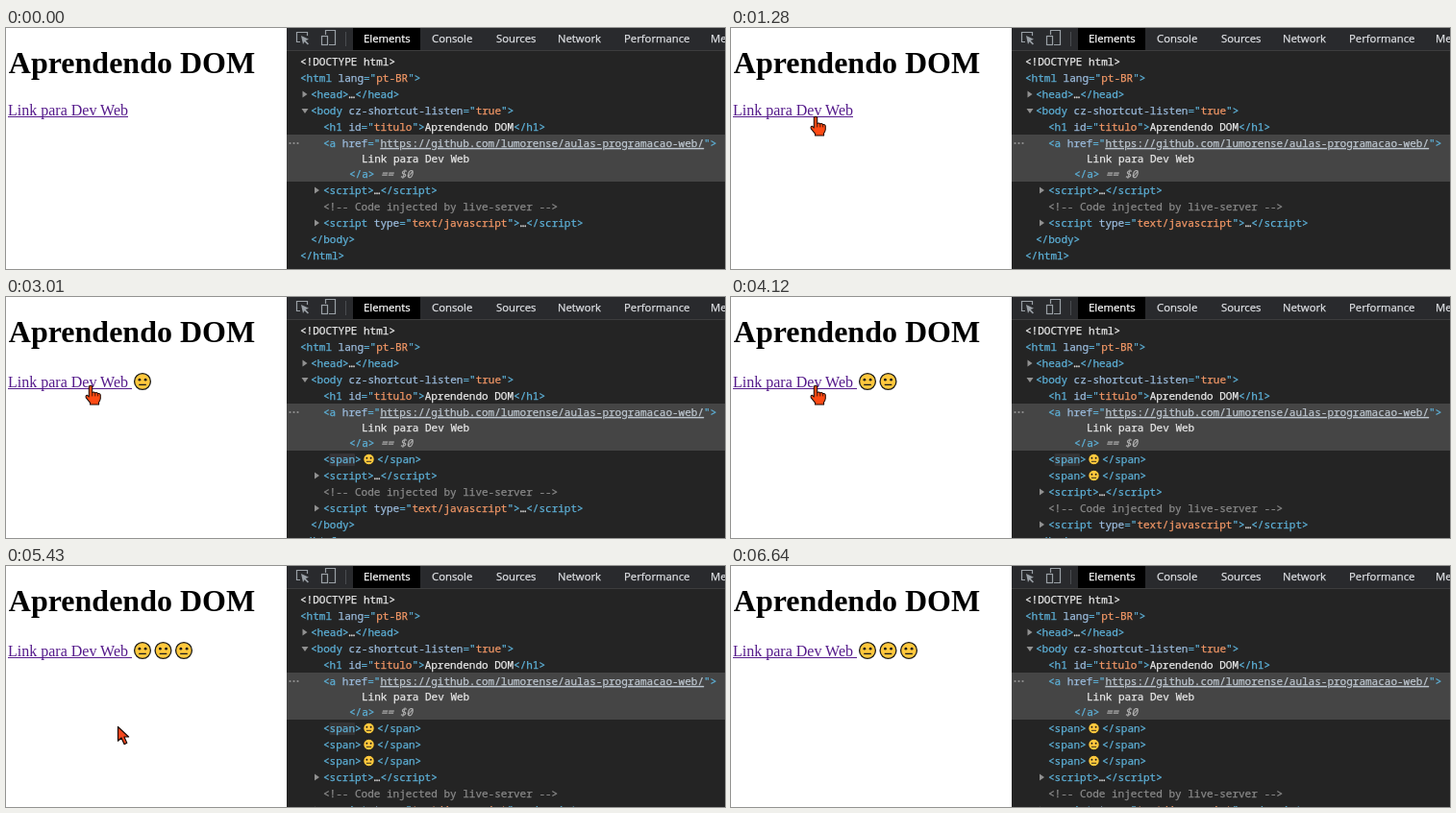
An HTML page for the animation above (6.68 s loop, 748x251 px).

```html
<!DOCTYPE html>
<html lang="pt-BR">
<head>
<meta charset="utf-8">
<style>
html, body { margin: 0; width: 100%; height: 100%; overflow: hidden; background: #fff; }
svg { display: block; }
text { white-space: pre; }
.page { font-family: "Liberation Serif", "Times New Roman", serif; }
.tabs { font: 11.3px "Open Sans", "Noto Sans", sans-serif; color: #dfe1e5; }
.code { font: 11px "Noto Sans Mono", "DejaVu Sans Mono", monospace; }
.tabs text, .code tspan { fill: currentColor; stroke: currentColor; stroke-width: .25; }
</style>
</head>
<body>
<svg id="stage" width="748" height="251" viewBox="0 0 748 251">
  <defs>
    <g id="face">
      <circle r="8.4" fill="#ffc83d" stroke="#1b1b1b" stroke-width="1.3"/>
      <circle cx="-3.1" cy="-1.8" r="1.4" fill="#1b1b1b"/>
      <circle cx="3.1" cy="-1.8" r="1.4" fill="#1b1b1b"/>
      <path d="M-3.8 3.4H3.8" stroke="#1b1b1b" stroke-width="1.3"/>
    </g>
  </defs>
  <rect width="748" height="251" fill="#fff"/>
  <g class="page">
    <text x="2.8" y="47" font-size="32" font-weight="700">Aprendendo DOM</text>
    <g id="link" fill="#551a8b">
      <text x="2" y="91" font-size="16">Link para Dev Web</text>
      <rect id="underline" x="2" y="92" width="125" height="1"/>
    </g>
    <g id="faces"></g>
  </g>

  <rect x="292" width="456" height="251" fill="#242424"/>
  <rect x="292" width="456" height="23" fill="#292a2d"/>
  <rect x="292" y="23" width="456" height="1" fill="#3d3d3d"/>
  <rect x="361" width="70" height="23" fill="#000"/>
  <rect x="353" y="4" width="1" height="15" fill="#4a4c50"/>
  <g fill="none" stroke="#9aa0a6" stroke-width="1.2">
    <path d="M306 14.5H302.5V4.5H313.5V8"/>
    <path d="M307 8L315 11.7L311.7 13L315 16.5L313.8 17.6L310.5 14.2L309 17Z" fill="#9aa0a6" stroke="none"/>
    <path d="M332.5 7V2.5H342.5V17.5H336"/>
    <rect x="328.5" y="8.5" width="6" height="9"/>
  </g>
  <g class="tabs" id="tabs"></g>
  <rect x="292" y="111" width="456" height="49" fill="#454545"/>
  <g fill="#919191">
    <circle cx="295.5" cy="120" r="1.1"/><circle cx="299.5" cy="120" r="1.1"/><circle cx="303.5" cy="120" r="1.1"/>
  </g>
  <g class="code" id="fixed"></g>
  <g class="code" id="spans"></g>
  <g class="code" id="rest"></g>

  <g id="hand" stroke="#1a0a05" stroke-linejoin="round">
    <path d="M-1.8 1.2Q0-.8 1.8 1.2V8Q3.4 6.6 5 8.3Q6.8 7.3 8 9Q10.2 8.4 10.8 10.4V14.5Q10.5 17 9 18.5V21H-.5V19L-5 13.5Q-5.8 11 -3.6 10.8L-1.8 12.5Z" fill="#ff4a14" stroke-width="1.1"/>
    <path d="M1.8 8V12M5 8.5V12M8 9.2V12" fill="none" stroke-width=".8"/>
  </g>
  <path id="arrow" d="M.5 .5V15.2L4 12L7 18.6L9.8 17.3L6.9 11H11.6Z" fill="#f4481e" stroke="#1a0a05" stroke-width="1.2" stroke-linejoin="round"/>
</svg>
<script>
const LOOP = 6680;
const CLICKS = [2130, 3170, 4450];
const ROW = 17;
const TAG = "#5db0d7", ATTR = "#9bbbdc", VALUE = "#f29766", TEXT = "#e8e8e8", NOTE = "#898989", URL_COLOR = "#bdc6cf";
const $ = id => document.getElementById(id);
const clamp = (v, low = 0, high = 1) => Math.min(high, Math.max(low, v));

function add(parent, name, attrs = {}, content = "") {
  const node = document.createElementNS("http://www.w3.org/2000/svg", name);
  for (const key in attrs) node.setAttribute(key, attrs[key]);
  node.textContent = content;
  parent.append(node);
  return node;
}

// The two wrapped lines of the selected element sit 1px tighter.
const baseline = row => 39 + row * ROW - clamp(row - 5, 0, 2);

// parts: alternating colour and text
function line(parent, row, x, ...parts) {
  const text = add(parent, "text", { x, y: baseline(row) });
  for (let i = 0; i < parts.length; i += 2) add(text, "tspan", { color: parts[i] }, parts[i + 1]);
  return text;
}

function toggle(parent, row, x, open) {
  const d = open ? "M-1-2H6L2.5 3Z" : "M0-3.5L5 0L0 3.5Z";
  add(parent, "path", { d, fill: "#919191", transform: `translate(${x} ${baseline(row) - 4})` });
}

[["Elements", 372], ["Console", 443], ["Sources", 510], ["Network", 574], ["Performance", 643], ["Memory", 733]]
  .forEach(([name, x], i) => add($("tabs"), "text", { x, y: 15, ...(i ? {} : { color: "#fff" }) }, name));

const fixed = $("fixed"), rest = $("rest");
line(fixed, 0, 306, TEXT, "<!DOCTYPE html>");
line(fixed, 1, 306, TAG, "<html ", ATTR, "lang", TAG, '="', VALUE, "pt-BR", TAG, '">');
line(fixed, 2, 317, TAG, "<head>", TEXT, "…", TAG, "</head>");
toggle(fixed, 2, 308.5);
line(fixed, 3, 317, TAG, "<body ", ATTR, "cz-shortcut-listen", TAG, '="', VALUE, "true", TAG, '">');
toggle(fixed, 3, 308.5, true);
line(fixed, 4, 330, TAG, "<h1 ", ATTR, "id", TAG, '="', VALUE, "titulo", TAG, '">', TEXT, "Aprendendo DOM", TAG, "</h1>");
const anchor = line(fixed, 5, 330, TAG, "<a ", ATTR, "href", TAG, '="',
  URL_COLOR, "https://github.com/lumorense/aulas-programacao-web/", TAG, '">');
anchor.children[3].setAttribute("text-decoration", "underline");
line(fixed, 6, 370, TEXT, "Link para Dev Web");
const closing = line(fixed, 7, 357, TAG, "</a>", "#b4b4b4", " == $0");
closing.children[1].setAttribute("font-style", "italic");

line(rest, 8, 330, TAG, "<script>", TEXT, "…", TAG, "<\/script>");
toggle(rest, 8, 321);
line(rest, 9, 330, NOTE, "<!-- Code injected by live-server -->");
line(rest, 10, 330, TAG, "<script ", ATTR, "type", TAG, '="', VALUE, "text/javascript", TAG, '">', TEXT, "…", TAG, "<\/script>");
toggle(rest, 10, 321);
line(rest, 11, 317, TAG, "</body>");
line(rest, 12, 306, TAG, "</html>");

const spans = CLICKS.map((_, i) => {
  const group = add($("spans"), "g");
  const flash = add(group, "rect", { x: 336.5, y: baseline(8) - 10, width: 26.5, height: 13, rx: 1 });
  const name = line(group, 8, 330, TAG, "<", TAG, "span", TAG, ">").children[1];
  line(group, 8, 386, TAG, "</span>");
  add(group, "use", { href: "#face", transform: `translate(377.5 ${baseline(8) - 4}) scale(.68)` });
  const face = add($("faces"), "use", { href: "#face", x: 142 + i * 21.5, y: 88 });
  return { group, flash, name, face };
});

const smooth = v => v * v * (3 - 2 * v);
const easeOut = v => 1 - (1 - v) ** 2.4;
const mix = (a, b, k) => `rgb(${a.map((v, i) => Math.round(v + (b[i] - v) * k))})`;

// Purple fades to grey, then to the panel colour.
function flashColor(age) {
  return age < 1120
    ? mix([158, 54, 153], [51, 51, 51], easeOut(clamp(age / 1120)))
    : mix([51, 51, 51], [36, 36, 36], smooth(clamp((age - 1120) / 280)));
}

// time, x, y of the pointer tip
const PATH = [[560, 124, 253], [1140, 90, 92], [4950, 90, 92], [5350, 116, 167], [5850, 116, 167], [6400, 128, 253]];

function pointer(t) {
  if (t <= PATH[0][0] || t >= PATH.at(-1)[0]) return [-50, -50];
  const i = PATH.findIndex(p => p[0] > t);
  const [t0, x0, y0] = PATH[i - 1], [t1, x1, y1] = PATH[i];
  const k = smooth((t - t0) / (t1 - t0));
  return [x0 + (x1 - x0) * k, y0 + (y1 - y0) * k];
}

function render(t) {
  const count = CLICKS.filter(c => t >= c).length;
  spans.forEach(({ group, flash, name, face }, i) => {
    const shown = i < count, age = t - CLICKS[i];
    group.style.display = face.style.display = shown ? "" : "none";
    if (!shown) return;
    group.setAttribute("transform", `translate(0 ${(count - 1 - i) * ROW})`);
    flash.setAttribute("fill", flashColor(age));
    name.setAttribute("color", mix([255, 255, 255], [93, 176, 215], easeOut(clamp(age / 1120))));
  });
  rest.setAttribute("transform", `translate(0 ${count * ROW})`);
  $("link").setAttribute("transform", `translate(0 ${count ? 3 : 0})`);
  $("underline").setAttribute("width", count ? 129 : 125);

  const [x, y] = pointer(t);
  const overLink = x < 131 && y < 97;
  $("hand").style.display = overLink ? "" : "none";
  $("arrow").style.display = overLink ? "none" : "";
  $("hand").setAttribute("transform", `translate(${x - 2} ${y}) scale(.95)`);
  $("arrow").setAttribute("transform", `translate(${x} ${y})`);
}

const start = performance.now();
function tick() {
  render((performance.now() - start) % LOOP);
  requestAnimationFrame(tick);
}
tick();
</script>
</body>
</html>
```
